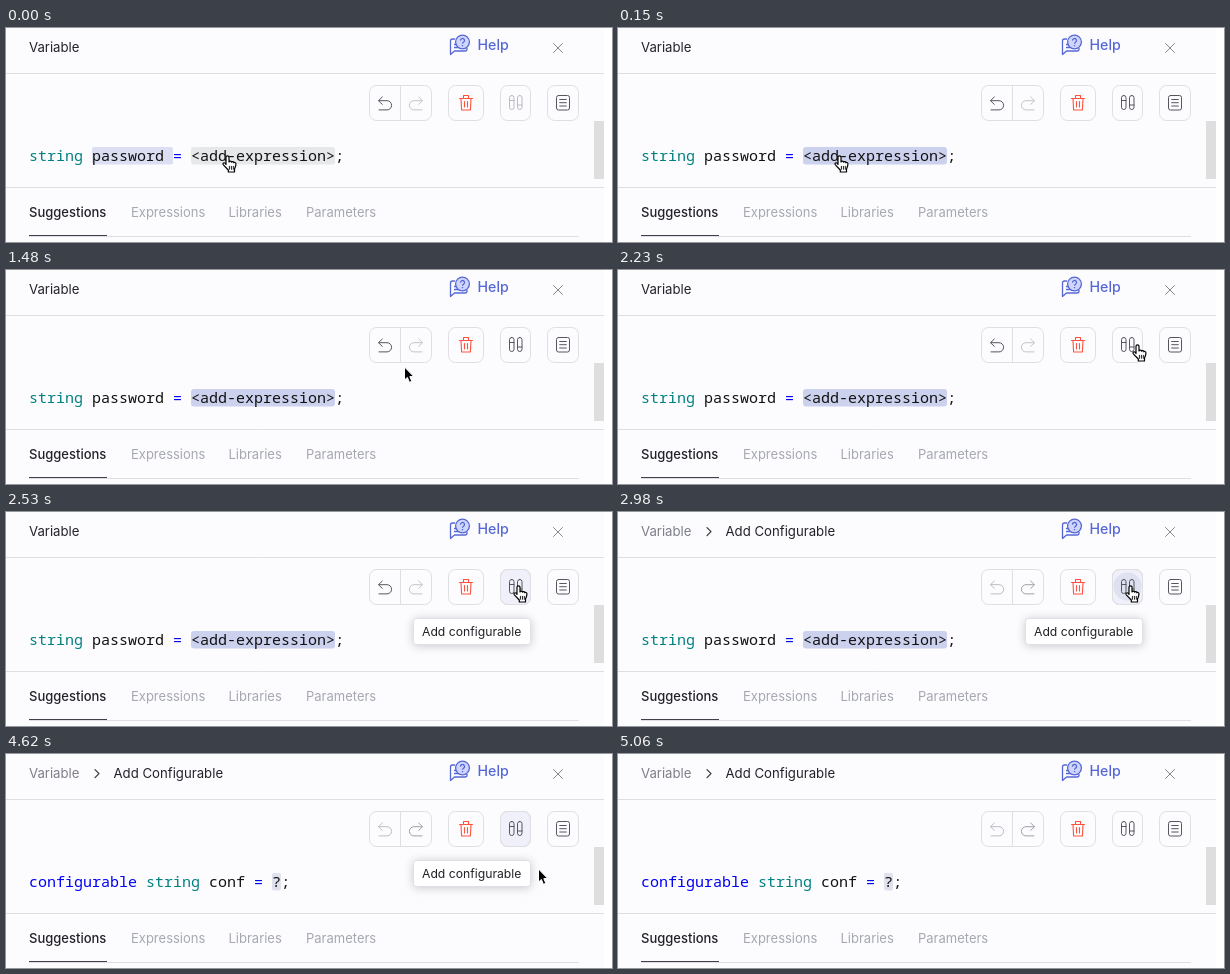
Animation of 606 by 214 pixels, one loop 5380 ms. Source, as an HTML page:

```html
<!DOCTYPE html>
<html lang="en">
<head>
<meta charset="utf-8">
<title>Add configurable</title>
<style>
  html, body { margin: 0; width: 100%; height: 100%; overflow: hidden; background: #fff; }
  svg { display: block; }
  text { font: 13px Inter, sans-serif; fill: #222228; white-space: pre; }
  .title { font-size: 13.2px; }
  .code text { font: 15px "Noto Sans Mono", monospace; fill: #111; }
  .code .type { fill: #008080; }
  .code .key { fill: #0000f5; }
  .muted { fill: #a6a8b0; }
  .line { fill: none; stroke: #dfdfe3; }
  .icon { fill: none; stroke: #55565e; stroke-linecap: round; stroke-linejoin: round; }
  #tip rect { fill: #fff; stroke: #dfdfe5; filter: drop-shadow(0 1px 5px #0003); }
  #tip text { font-size: 12.2px; }
</style>
</head>
<body>
<svg width="606" height="214" viewBox="0 0 606 214">
  <defs>
    <g id="hand" stroke="#000" stroke-linejoin="round" stroke-linecap="round">
      <path fill="#fff" stroke-width="1.2" d="M4 9.5V2.3a1.5 1.5 0 0 1 3 0V7c.3-1.3 2.5-1.2 2.6.2c.4-1 2.2-.8 2.3.6c.5-.8 2-.4 2 .8c.2 2.5-.9 3.9-1.4 5.4V17H6.3V15C5 13.5 3 11.8 1.2 9.6c-.8-1.2.9-2.6 1.8-1.4z"/>
      <path d="M7.4 11.3v3M9.4 11.3v3M11.3 11.3v3" stroke-width=".9"/>
    </g>
    <path id="arrow" d="M1.5 1V14l2.9-2.6 2 4.9 2.4-1-2-4.7h4z" stroke="#fff" stroke-linejoin="round"/>
    <path id="back" d="M4.3 0L.5 3.7 4.3 7.4M.8 3.7H9a4.6 4.6 0 0 1 0 9.2H1"/>
  </defs>

  <path fill="#fcfcff" d="M0 0h598v214H0z"/>

  <text id="root" class="title" x="23" y="24">Variable</text>
  <g id="crumb">
    <path class="icon" d="M89 15.7l4 4-4 4" style="stroke:#333;stroke-width:1.2"/>
    <text class="title" x="107.5" y="24">Add Configurable</text>
  </g>
  <g fill="none" stroke="#5567d5" stroke-width="1.3" stroke-linejoin="round">
    <path d="M449 11h-2.5a2 2 0 0 0-2 2V26.5l4-3.5H459a2 2 0 0 0 2-2V20M448 16.5h3M448 19.5h7"/>
    <circle cx="456.5" cy="14" r="6.9" fill="#cfd5fb"/>
    <path d="M454.5 12.6a2 2 0 1 1 3 1.6q-1 .6-1 1.6M456.5 17v1.2"/>
  </g>
  <text x="471.5" y="22" style="font-size:14.2px;font-weight:500;fill:#5567d5">Help</text>
  <path class="icon" style="stroke:#85868e" d="M547.5 15.5l9 9m0-9l-9 9"/>

  <path class="line" d="M0 45.5H598M0 159.5H598M23 208.5H573"/>
  <path fill="#dededf" d="M588 93h10v58h-10z"/>

  <g class="line">
    <rect x="363.5" y="57.5" width="62" height="35" rx="7"/>
    <path d="M394.5 57.5v35"/>
    <rect x="442.5" y="57.5" width="35" height="35" rx="7"/>
    <rect id="hover" x="494.5" y="57.5" width="30" height="35" rx="7" fill="#eff0fa"/>
    <rect x="494.5" y="57.5" width="30" height="35" rx="7"/>
    <rect x="541.5" y="57.5" width="31" height="35" rx="7"/>
  </g>
  <circle id="ripple" cx="509.5" cy="74.5" fill="#d3d6ea"/>
  <g class="icon">
    <use id="undo" href="#back" x="372" y="69"/>
    <use id="redo" href="#back" transform="translate(417 69) scale(-1 1)"/>
    <path stroke="#fe523c" stroke-width="1.1" d="M453.5 70.5h13M457.500 70v-2.500h5v2.500M455 71l.6 11h8.800l.6-11M458.500 73.500v5.500M461.500 73.500v5.500"/>
    <g id="config">
      <rect x="503.5" y="67.5" width="4.5" height="14" rx="2.2"/>
      <rect x="511.5" y="67.5" width="4.5" height="14" rx="2.2"/>
      <path d="M503.5 72.5h4.5M511.5 77h4.5"/>
    </g>
    <rect x="550.5" y="67.5" width="13" height="14.5" rx="2"/>
    <path d="M553.7 71.500h6.600M553.700 74.700h6.600M553.700 78h6.600"/>
  </g>

  <g class="code" id="before">
    <rect id="nameMark" x="86" y="119" width="81" height="17.500" rx="2" fill="#dcdff3"/>
    <rect id="exprMark" x="185" y="119" width="144" height="17.500" rx="3"/>
    <text class="type" x="23" y="133">string</text>
    <text x="86" y="133">password</text>
    <text class="key" x="167" y="133">=</text>
    <text x="185" y="133">&lt;add-expression&gt;;</text>
  </g>
  <g class="code" id="after">
    <rect x="266" y="119" width="9" height="17.500" rx="2" fill="#dfe1ec"/>
    <text class="key" x="23" y="133">configurable</text>
    <text class="type" x="140" y="133">string</text>
    <text x="203" y="133">conf</text>
    <text class="key" x="248" y="133">=</text>
    <text x="266" y="133">?;</text>
  </g>

  <text x="23" y="189" style="font-weight:500">Suggestions</text>
  <text class="muted" x="125" y="189">Expressions</text>
  <text class="muted" x="222.5" y="189">Libraries</text>
  <text class="muted" x="300" y="189">Parameters</text>
  <path d="M23 207.5h78" stroke="#40404b"/>

  <g id="tip">
    <rect x="407.5" y="106.5" width="117" height="26" rx="3"/>
    <text x="416" y="124">Add configurable</text>
  </g>
  <use id="cursor"/>
</svg>
<script>
const LOOP = 5380;
const el = id => document.getElementById(id);
const show = (id, on) => el(id).style.display = on ? '' : 'none';
const stroke = (id, color) => el(id).style.stroke = color;

// Each row: start time, then the values held until the next row.
const cursorSteps = [
  [0, 'hand', 216, 127], [1040, 'hand', 228, 125], [1190, 'hand', 277, 115],
  [1330, 'hand', 291, 114], [1480, 'arrow', 397, 96], [1930, 'arrow', 525, 76],
  [2080, 'arrow', 528, 76], [2230, 'hand', 514, 74], [2380, 'hand', 507, 73],
  [4620, 'arrow', 531, 114], [4770, 'arrow', 568, 177], [4910, 'arrow', 571, 195],
  [5060, '', 0, 0]
];
const tipSteps = [[0, 0, 1], [2380, .6, .94], [2530, 1, 1], [4770, .2, .8], [4910, 0, 1]]; // opacity, scale
const hoverSteps = [[0, 0], [2380, .6], [2530, 1], [4770, .3], [4910, 0]];
const rippleSteps = [[0, 0, 0], [2830, 11, .8], [2980, 14, .6], [4620, 0, 0]]; // radius, opacity
const at = (steps, t) => steps.findLast(step => step[0] <= t).slice(1);

function draw(t) {
  const selected = t >= 150, opened = t >= 2980, inserted = t >= 3420;
  show('crumb', opened);
  el('root').style.fill = opened ? '#7d7e87' : '';
  stroke('undo', opened ? '#bcbdc2' : '#55565e');
  stroke('redo', opened ? '#a0a1a7' : '#c4c5c9');
  stroke('config', selected ? '#55565e' : '#b9bac0');

  show('before', !inserted);
  show('after', inserted);
  show('nameMark', !selected);
  el('exprMark').style.fill = selected ? '#ccd1ee' : '#e6e8ea';

  const [opacity, scale] = at(tipSteps, t);
  el('tip').style.opacity = opacity;
  el('tip').setAttribute('transform', `translate(466 119.5) scale(${scale} ${scale * scale}) translate(-466 -119.5)`);
  el('hover').style.opacity = at(hoverSteps, t)[0];
  const [radius, strength] = at(rippleSteps, t);
  el('ripple').setAttribute('r', radius);
  el('ripple').style.opacity = strength;

  const [shape, x, y] = at(cursorSteps, t);
  show('cursor', shape);
  el('cursor').setAttribute('href', '#' + shape);
  el('cursor').setAttribute('transform', `translate(${x} ${y})`);
}

function frame() {
  draw(performance.now() % LOOP);
  requestAnimationFrame(frame);
}
frame();
</script>
</body>
</html>
```
